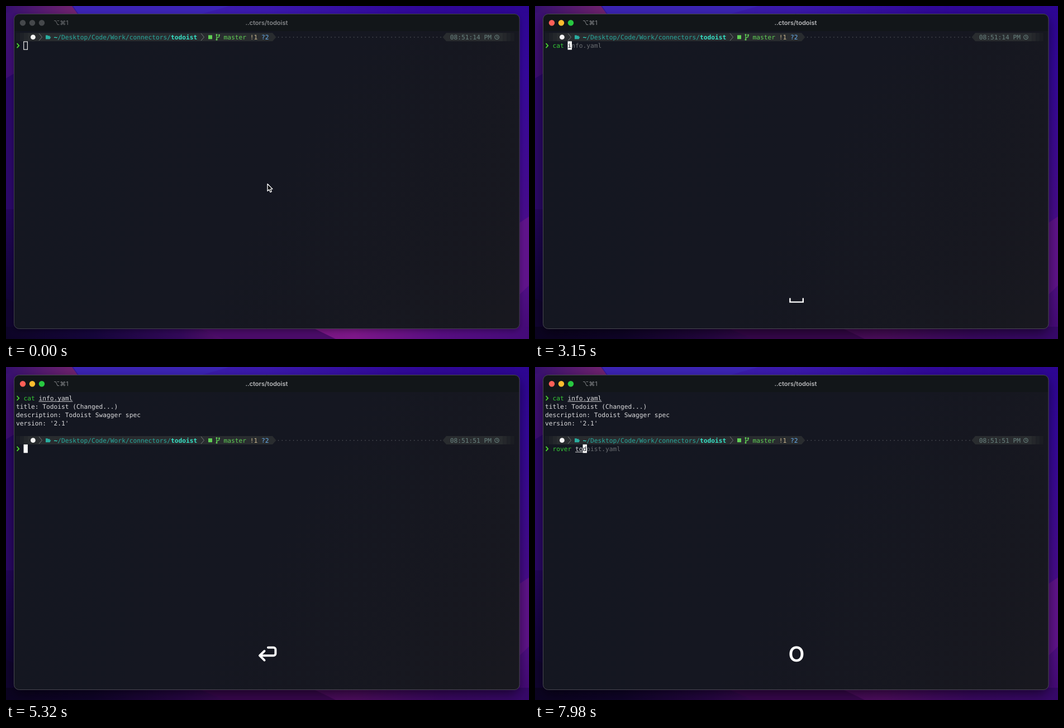
These frames come from a looping animation (936x598 px, 8000 ms). An HTML page with a canvas:

```html
<!DOCTYPE html>
<html lang="en">
<head>
<meta charset="utf-8">
<title>Terminal session</title>
<style>
html, body { margin: 0; width: 100%; height: 100%; overflow: hidden; background: #1d0750; }
canvas { display: block; width: 936px; height: 598px; }
</style>
</head>
<body>
<canvas id="stage"></canvas>
<script>
(() => {
const W = 936, H = 598, LOOP = 8000;
const canvas = document.getElementById('stage');
const ctx = canvas.getContext('2d');
const dpr = window.devicePixelRatio || 1;
canvas.width = W * dpr;
canvas.height = H * dpr;

const MONO = '"DejaVu Sans Mono", "Liberation Mono", monospace';
const SANS = 'Inter, "DejaVu Sans", sans-serif';
const CELL = 6.755, LINE = 15.15, LEFT = 18;
const colX = c => LEFT + c * CELL;
const rowY = r => 48.2 + r * LINE;

const ACTIVE_AT = 1050;   // window gains focus
const ECHO = 60;          // delay between key press and terminal output
const ENTER_AT = 5180;

// time, key
const first = [
  [2520, 'c'], [2700, 'a'], [2880, 't'], [3080, ' '],
  [3330, 'i'], [3470, 'n'], [3620, 'f'], [3780, 'o'], [3970, '.'],
  [4130, 'y'], [4270, 'a'], [4420, 'm'], [4550, 'l']
];
const second = [
  [6550, 'r'], [6780, 'o'], [6950, 'v'], [7120, 'e'],
  [7290, 'r'], [7500, ' '], [7720, 't'], [7890, 'o']
];
const keys = [...first, [ENTER_AT, '\n'], ...second];

const GREEN = '#36c936', WHITE = '#dcdcde', GHOST = '#696c70', SEGMENT = '#292c2f';

function text(str, x, y, color, font) {
  ctx.font = font;
  ctx.fillStyle = color;
  ctx.fillText(str, x, y);
}

function mono(str, c, r, color, bold) {
  text(str, colX(c), rowY(r) + 11.8, color, (bold ? 'bold ' : '') + '11.22px ' + MONO);
}

function rect(x, y, w, h, color) {
  ctx.fillStyle = color;
  ctx.fillRect(x, y, w, h);
}

function disc(x, y, r, color) {
  ctx.fillStyle = color;
  ctx.beginPath();
  ctx.arc(x, y, r, 0, Math.PI * 2);
  ctx.fill();
}

function poly(color, ...p) {
  ctx.fillStyle = color;
  ctx.beginPath();
  for (let i = 0; i < p.length; i += 2) ctx.lineTo(p[i], p[i + 1]);
  ctx.closePath();
  ctx.fill();
}

function line(color, width, ...p) {
  ctx.strokeStyle = color;
  ctx.lineWidth = width;
  ctx.beginPath();
  for (let i = 0; i < p.length; i += 2) ctx.lineTo(p[i], p[i + 1]);
  ctx.stroke();
}

function gradient(x0, y0, x1, y1, ...colors) {
  const g = ctx.createLinearGradient(x0, y0, x1, y1);
  colors.forEach((c, i) => g.addColorStop(i / (colors.length - 1), c));
  return g;
}

function wallpaper(active) {
  rect(0, 0, W, H, '#2d0875');
  rect(0, 0, W, 20, gradient(0, 0, W, 0, '#34107a', '#3a20ae', '#3b18ad', '#31089b', '#2d0593'));
  poly(gradient(0, 0, 130, 0, '#36106f', '#74246f'), 0, 0, 118, 0, 132, 20, 0, 20);
  poly('#3c24b5', 120, 0, 400, 0, 330, 20, 134, 20);
  rect(0, 12, 20, H, gradient(0, 0, 0, H, '#3c1172', '#3d0d72', '#2f0870', '#24065d', '#150441', '#0b0327'));
  poly('#2b0869', 0, 130, 20, 118, 20, 365, 0, 365);
  poly('#10042f', 0, 525, 20, 535, 20, H, 0, H);
  rect(915, 12, 21, H, gradient(0, 0, 0, H, '#2d0593', '#34079a', '#3c0994', '#450b8d', '#53108a', '#430975'));
  poly('#5f138b', 915, 392, 936, 378, 936, 502, 915, 522);
  const base = active
    ? ['#0b0321', '#10042b', '#270645', '#480c5c', '#4f0d61', '#3c0865', '#37086a']
    : ['#0d0427', '#15053a', '#320859', '#72147b', '#7d1789', '#570d82', '#440a78'];
  rect(0, 576, W, 22, gradient(0, 0, W, 0, ...base));
  poly(active ? '#3a0750' : '#4a0b68', 340, 576, 545, 576, 590, H, 390, H);
}

function appWindow(active) {
  const frameShape = new Path2D();
  frameShape.roundRect(14.5, 14.5, 904.5, 565, 9);

  ctx.save();
  ctx.shadowColor = active ? 'rgba(0,0,0,.55)' : 'rgba(0,0,0,.35)';
  ctx.shadowBlur = (active ? 22 : 12) * dpr;
  ctx.shadowOffsetY = (active ? 8 : 3) * dpr;
  ctx.fillStyle = '#151720';
  ctx.fill(frameShape);
  ctx.restore();

  ctx.save();
  ctx.clip(frameShape);
  rect(14, 45, 906, 536, gradient(14, 45, 919, 580, '#141721', '#151721', '#18181f'));
  rect(14, 14, 906, 31, '#121619');
  ctx.restore();
  ctx.strokeStyle = active ? '#484850' : '#41414a';
  ctx.lineWidth = 1;
  ctx.stroke(frameShape);

  const lights = active ? ['#ff5f57', '#febc2e', '#28c840'] : ['#45484b', '#45484b', '#45484b'];
  lights.forEach((c, i) => disc(30 + 17 * i, 30.3, 5.2, c));
  text('⌥⌘1', 85, 34, active ? '#8b8d90' : '#737578', '11px ' + SANS);
  ctx.textAlign = 'center';
  text('..ctors/todoist', 466.5, 34, active ? '#b9babc' : '#85878a', '600 11.1px ' + SANS);
  ctx.textAlign = 'left';
}

function statusBar(r, time) {
  const y = rowY(r), mid = y + 7.7, h = 15;
  [.25, .5, .78].forEach((a, i) => {
    ctx.globalAlpha = a;
    rect(colX(i), y, CELL, h, SEGMENT);
    rect(colX(131 - i), y, CELL, h, SEGMENT);
  });
  ctx.globalAlpha = 1;
  const a = colX(3), b = 477, c = 788, d = colX(129);
  poly(SEGMENT, a, y, b, y, b + 6.5, mid, b, y + h, a, y + h);
  poly(SEGMENT, d, y, c, y, c - 6.5, mid, c, y + h, d, y + h);

  disc(48.4, mid, 4.4, '#f4f4f4');
  for (const x of [59, 349]) line('#75797a', 1, x, y + 1, x + 5.5, mid, x, y + h - 1);

  poly('#2aada0', 71, mid - 3.5, 74.5, mid - 3.5, 75.5, mid - 2.3, 78.5, mid - 2.3,
    78.5, mid - .5, 80.5, mid - .5, 78.5, mid + 3.7, 71, mid + 3.7);
  mono('~', 10, r, '#30dfc6', true);
  mono('/Desktop/Code/Work/connectors/', 11, r, '#27aa9f');
  mono('todoist', 41, r, '#35e2c7', true);

  const leaf = '#5fd055';
  rect(362, mid - 3.5, 7, 7, leaf);
  line(leaf, 1.3, 377, mid - 3, 377, mid + 3.5);
  line(leaf, 1.3, 381.5, mid - 2.5, 381.5, mid - .5, 377, mid + 1.8);
  disc(377, mid - 4.2, 1.5, leaf);
  disc(377, mid + 4.4, 1.5, leaf);
  disc(381.5, mid - 3.6, 1.5, leaf);
  mono('master', 55, r, leaf);
  mono('!1', 62, r, '#ccb890');
  mono('?2', 65, r, '#68aef0');

  for (let i = 69; i < 113; i++) rect(colX(i) + 2.8, mid - .5, 1.3, 1.3, '#5b5e64');

  mono(time, 115, r, '#6a8380');
  ctx.strokeStyle = '#6a8380';
  ctx.lineWidth = 1.1;
  ctx.beginPath();
  ctx.arc(878.5, mid, 3.7, 0, Math.PI * 2);
  ctx.stroke();
  line('#6a8380', 1, 878.5, mid - 2, 878.5, mid + .3, 880.5, mid + .3);
}

function command(r, typed, split) {
  const y = rowY(r), mid = y + 7.8;
  line('#4bd62f', 1.8, 19.6, mid - 4, 23.2, mid, 19.6, mid + 4);
  mono(typed.slice(0, split), 2, r, GREEN);
  const arg = typed.slice(split + 1);
  if (arg) {
    mono(arg, 3 + split, r, WHITE);
    rect(colX(3 + split), y + 13.2, arg.length * CELL, 1, WHITE);
  }
}

function inputLine(r, typed, full, split, active) {
  const n = typed.length, x = colX(2 + n), y = rowY(r);
  command(r, typed, split);
  if (n) mono(full.slice(n), 2 + n, r, GHOST);
  if (!active) {
    ctx.strokeStyle = '#e8e8e8';
    ctx.lineWidth = 1.2;
    ctx.strokeRect(x + .2, y + .8, 6.7, 14);
    return;
  }
  rect(x, y, 7.4, 15.2, '#fff');
  if (n && n < full.length) mono(full[n], 2 + n, r, '#15171f');
}

function keyCap(key) {
  ctx.save();
  if (key === ' ') {
    line('#fff', 2.4, 456.4, 524.5, 456.4, 531.6, 479.8, 531.6, 479.8, 524.5);
  } else if (key === '\n') {
    ctx.lineJoin = ctx.lineCap = 'round';
    ctx.strokeStyle = '#fff';
    ctx.lineWidth = 4;
    ctx.beginPath();
    ctx.moveTo(469, 503.8);
    ctx.arcTo(482.4, 503.8, 482.4, 518.2, 3.5);
    ctx.arcTo(482.4, 518.2, 455, 518.2, 3.5);
    ctx.lineTo(455, 518.2);
    ctx.stroke();
    line('#fff', 4, 462.5, 510, 454, 518.2, 462.5, 526.6);
  } else {
    ctx.textAlign = 'center';
    text(key.toUpperCase(), 468, 529.3, '#fff', '600 37.5px ' + SANS);
  }
  ctx.restore();
}

function arrowPointer(x, y) {
  ctx.save();
  ctx.lineJoin = 'round';
  ctx.strokeStyle = '#fff';
  ctx.lineWidth = 1.3;
  poly('#0c0d10', x, y, x, y + 12.8, x + 2.9, y + 10.2, x + 5, y + 14.8,
    x + 7.3, y + 13.7, x + 5.2, y + 9.3, x + 9, y + 9.1);
  ctx.stroke();
  ctx.restore();
}

function textPointer(x, y) {
  for (const [color, w] of [['#f2f2f2', 3.2], ['#101115', 1.1]]) {
    line(color, w, x, y - 6.5, x, y + 6.5);
    for (const s of [-1, 1]) {
      line(color, w, x - 3.6, y + 7 * s, x - 1.2, y + 6.8 * s, x, y + 5.6 * s,
        x + 1.2, y + 6.8 * s, x + 3.6, y + 7 * s);
    }
    line(color, w, x - 2, y + 1, x + 2, y + 1);
  }
}

const typedBy = (list, t) => list.filter(k => k[0] + ECHO <= t).map(k => k[1]).join('');

function draw(t) {
  ctx.setTransform(dpr, 0, 0, dpr, 0, 0);
  ctx.textRendering = 'geometricPrecision';
  const active = t >= ACTIVE_AT;
  wallpaper(active);
  appWindow(active);

  if (t < ENTER_AT + ECHO) {
    statusBar(0, '08:51:14 PM');
    inputLine(1, typedBy(first, t), 'cat info.yaml', 3, active);
  } else {
    command(0, 'cat info.yaml', 3);
    ['title: Todoist (Changed...)', 'description: Todoist Swagger spec', "version: '2.1'"]
      .forEach((s, i) => mono(s, 0, i + 1, WHITE));
    statusBar(5, '08:51:51 PM');
    inputLine(6, typedBy(second, t), 'rover todoist.yaml', 5, active);
  }

  const pressed = keys.filter(k => k[0] <= t).pop();
  if (pressed) keyCap(pressed[1]);
  else if (active) textPointer(468, 320.3);
  else arrowPointer(468, 319.5);
}

const start = performance.now();
function tick() {
  draw((performance.now() - start) % LOOP);
  requestAnimationFrame(tick);
}
tick();
})();
</script>
</body>
</html>
```
